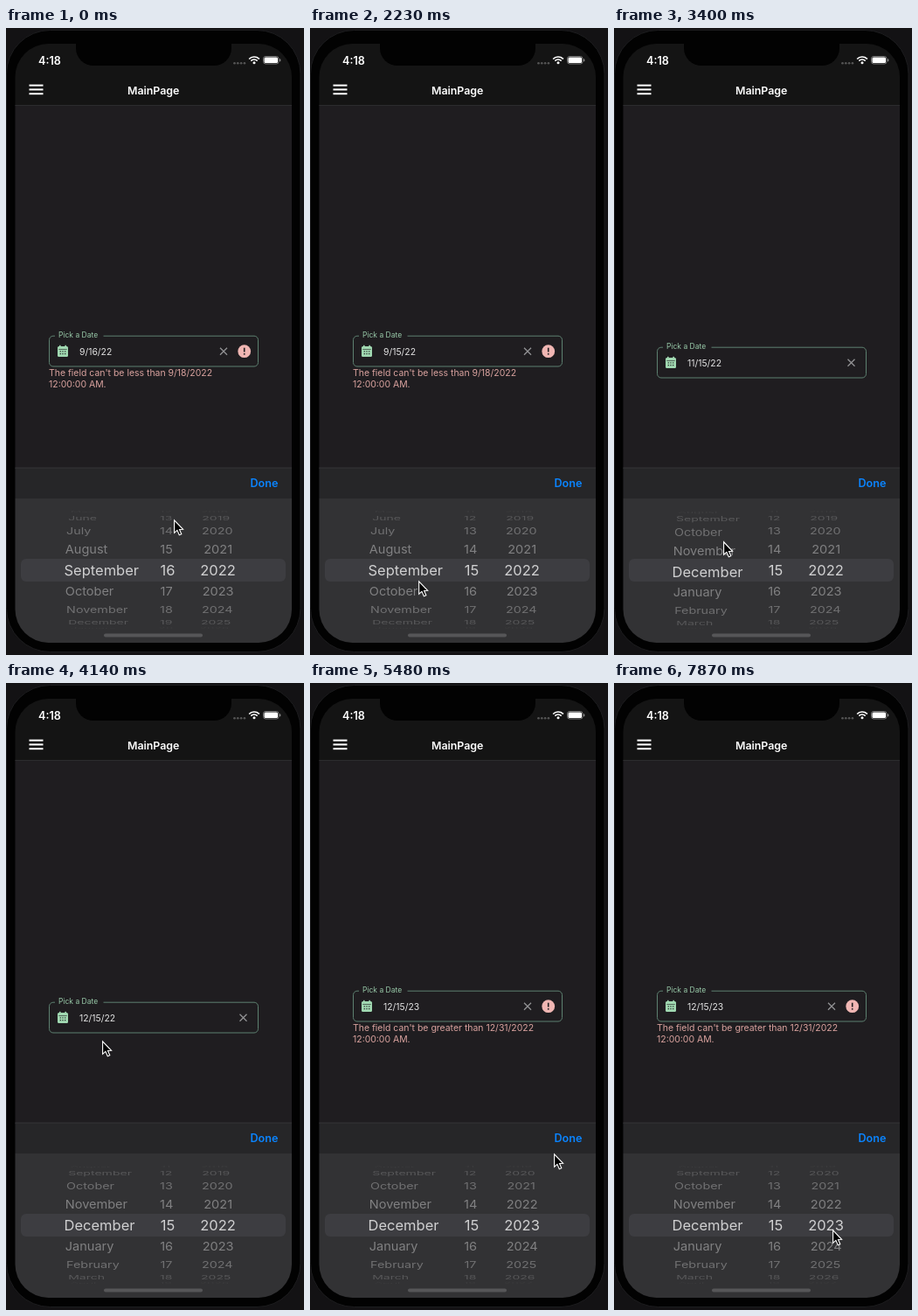
An HTML page with a canvas for the animation above (8 s loop, 341x717 px).

```html
<!DOCTYPE html>
<html lang="en">
<head>
<meta charset="utf-8">
<title>Date picker</title>
<style>
html, body { margin: 0; width: 100%; height: 100%; overflow: hidden; background: #111; }
canvas { display: block; width: 341px; height: 717px; }
</style>
</head>
<body>
<canvas id="stage"></canvas>
<script>
const W = 341, H = 717, LOOP = 8000, STEP = LOOP / 54;
const canvas = document.getElementById('stage');
const ctx = canvas.getContext('2d');
const dpr = window.devicePixelRatio || 1;
canvas.width = W * dpr;
canvas.height = H * dpr;

const PAGE = '#1f1d20', BEZEL = '#020202', GREEN = '#a0d8b1';
const MONTHS = ['January', 'February', 'March', 'April', 'May', 'June', 'July',
  'August', 'September', 'October', 'November', 'December'];

const FIRST = { year: 2022, month: 9, day: 16 };
const SPINS = [
  { part: 'day', by: -1, start: 300, end: 740 },
  { part: 'month', by: 2, start: 2230, end: 2670 },
  { part: 'month', by: 1, start: 2963, end: 3555 },
  { part: 'year', by: 1, start: 4593, end: 5000 }];
const FIELD_LAG = 250;

// Places the pointer heads for: time, x, y
const POINTER = [
  [0, 192, 562], [740, 184, 632], [1185, 122, 403], [1800, 203, 610], [2230, 124, 632],
  [2800, 122, 612], [3400, 125, 587], [4148, 110, 409], [4593, 248, 625], [5482, 279, 538],
  [5778, 287, 530], [6000, 287, 530], [6370, 257, 613], [7037, 173, 612], [7800, 250, 625]];

const clamp = p => Math.min(1, Math.max(0, p));
const easeOut = p => 1 - (1 - p) ** 2;
const easeInOut = p => p * p * (3 - 2 * p);

function pointerAt(t) {
  const next = POINTER.findIndex(k => k[0] > t);
  if (next < 0) return POINTER.at(-1).slice(1);
  const [t0, x0, y0] = POINTER[next - 1], [t1, x1, y1] = POINTER[next];
  const p = easeInOut((t - t0) / (t1 - t0));
  return [x0 + (x1 - x0) * p, y0 + (y1 - y0) * p];
}

function wheelsAt(t) {
  const wheels = { ...FIRST };
  for (const { part, by, start, end } of SPINS)
    wheels[part] += by * easeOut(clamp((t - start) / (end - start)));
  return wheels;
}

// The field takes a new date once the wheel has come to rest
function dateAt(t) {
  const date = { ...FIRST };
  for (const { part, by, end } of SPINS) if (t >= end + FIELD_LAG) date[part] += by;
  return date;
}

function errorFor({ year, month, day }) {
  const n = year * 10000 + month * 100 + day;
  return n < 20220918 ? 'less than 9/18/2022' : n > 20221231 ? 'greater than 12/31/2022' : '';
}

function box(x, y, w, h, r, fill) {
  ctx.beginPath();
  ctx.roundRect(x, y, w, h, r);
  if (fill) { ctx.fillStyle = fill; ctx.fill(); }
}

function outline(color, width = 1) {
  ctx.strokeStyle = color;
  ctx.lineWidth = width;
  ctx.stroke();
}

function rect(x, y, w, h, fill) {
  ctx.fillStyle = fill;
  ctx.fillRect(x, y, w, h);
}

function disc(x, y, r, fill) {
  ctx.beginPath();
  ctx.arc(x, y, r, 0, 7);
  ctx.fillStyle = fill;
  ctx.fill();
}

// y is the middle of the capital letters
function text(str, x, y, size, color, weight = 400, align = 'left') {
  ctx.font = `${weight} ${size}px Inter, Roboto, sans-serif`;
  ctx.textAlign = align;
  ctx.fillStyle = color;
  ctx.fillText(str, x, y + size * 0.363);
}

function drawPhone() {
  rect(0, 0, W, H, '#131214');
  box(0.5, 2.5, 336.5, 711, 50, BEZEL);
  outline('#1d1d1f');
}

function drawStatus() {
  box(80, -8, 178, 51, 20, BEZEL);
  text('4:18', 37, 37, 12.6, '#fff', 600);
  for (let i = 0; i < 4; i++) disc(261.5 + i * 3.8, 40.3, 1.3, '#555');
  for (const r of [8, 5]) {
    ctx.beginPath();
    ctx.arc(284, 41, r, -Math.PI * 0.76, -Math.PI * 0.24);
    outline('#fff', 1.7);
  }
  disc(284, 39.8, 1.5, '#fff');
  box(294.5, 32.5, 17.5, 8.5, 2.5);
  outline('#777');
  box(295.5, 33.5, 15.5, 6.5, 1.5, '#fff');
  box(313, 35.3, 1.3, 3, 0.6, '#888');
  for (let i = 0; i < 3; i++) rect(26.5, 64.6 + i * 4.8, 16, 2, '#fff');
  text('MainPage', 168.7, 71.5, 12.4, '#fff', 600, 'center');
}

function drawCalendar(x, y) {
  box(x, y + 1.3, 12, 12, 1.5, GREEN);
  rect(x + 2, y, 1.6, 2, GREEN);
  rect(x + 8.4, y, 1.6, 2, GREEN);
  rect(x + 1.3, y + 4.4, 9.4, 0.6, PAGE);
  for (let i = 0; i < 6; i++) rect(x + 2.7 + i % 3 * 2.7, y + 6.5 + (i > 2) * 2.7, 1.2, 1.2, PAGE);
}

function drawField(t) {
  const date = dateAt(t), error = errorFor(date);
  const y = error ? 352 : 365, mid = y + 17.7, x = error ? 249 : 271.5;
  box(49.5, y + 0.2, 239, 34.8, 4.5);
  outline('#5d8070');
  rect(56, y - 2, 55.5, 4, PAGE);
  text('Pick a Date', 60, y - 1.2, 8.5, '#98c9a8');
  drawCalendar(59, y + 10.8);
  text(`${date.month}/${date.day}/${date.year % 100}`, 84, mid + 0.2, 10.4, '#e2e2e2');
  ctx.beginPath();
  for (const s of [-1, 1]) {
    ctx.moveTo(x - 4, mid - 4 * s);
    ctx.lineTo(x + 4, mid + 4 * s);
  }
  outline('#929294', 1.3);
  if (!error) return;
  disc(272.7, mid, 7.4, '#f0b6b3');
  rect(271.9, mid - 4, 1.6, 4.8, PAGE);
  rect(271.9, mid + 2.3, 1.6, 1.6, PAGE);
  text("The field can't be " + error, 49, 394.5, 10.46, '#d9a29e');
  text('12:00:00 AM.', 49, 407, 10.46, '#d9a29e');
}

// One wheel column: rows on a cylinder, enlarged inside the selection band
function drawColumn(pos, label, x, bigX, align) {
  const near = Math.round(pos);
  for (const inBand of [false, true]) {
    ctx.save();
    ctx.beginPath();
    if (inBand) ctx.rect(11, 607, 316, 26);
    else { ctx.rect(11, 545, 316, 62); ctx.rect(11, 633, 316, 55); }
    ctx.clip();
    for (let row = near - 4; row <= near + 4; row++) {
      const d = row - pos, angle = d * 0.365;
      if (Math.abs(angle) > 1.55) continue;
      if (inBand) {
        text(label(row), bigX, 620.3 + d * 27, 16.5, '#d0d0d1', 400, align);
        continue;
      }
      const c = Math.cos(angle), s = 0.93 + 0.07 * c;
      ctx.save();
      ctx.translate(169, 620.2 + 67 * Math.sin(angle));
      ctx.scale(s, c);
      text(label(row), x - 169, 0, 14.6, `rgba(255,255,255,${0.41 * c})`, 400, align);
      ctx.restore();
    }
    ctx.restore();
  }
}

function drawPicker(t) {
  const { year, month, day } = wheelsAt(t);
  rect(10, 503, 318, 35, '#262628');
  rect(10, 502.5, 318, 1, '#343436');
  text('Done', 279.5, 520.7, 12.6, '#0a84ff', 600);
  rect(10, 538, 318, 166, '#323234');
  box(17, 607, 303, 26, 6, '#3d3d41');
  drawColumn(month, m => MONTHS[(m + 11) % 12], 67.3, 66.5, 'left');
  drawColumn(day, String, 183.7, 185, 'center');
  drawColumn(year, String, 243, 242.5, 'center');
  box(112, 692.5, 113, 4, 2, '#565658');
}

function drawPointer(t) {
  const [x, y] = pointerAt(t);
  ctx.save();
  ctx.translate(x + 0.6, y + 0.8);
  ctx.beginPath();
  [[0, 0], [0, 14.5], [3.3, 11.6], [5.7, 17], [8.2, 16], [5.9, 10.7], [10, 10.5]]
    .forEach(p => ctx.lineTo(...p));
  ctx.closePath();
  ctx.fillStyle = '#000';
  ctx.fill();
  outline('#fff', 1.1);
  ctx.restore();
}

function draw(now) {
  const t = Math.floor((now % LOOP + 8) / STEP) % 54 * STEP;
  ctx.setTransform(dpr, 0, 0, dpr, 0, 0);
  drawPhone();
  ctx.save();
  box(10.5, 18, 316.5, 685, 38);
  ctx.clip();
  rect(0, 0, W, 88, '#141414');
  rect(0, 88, W, 416, PAGE);
  rect(0, 88, W, 1, '#2c2c2e');
  drawStatus();
  drawField(t);
  drawPicker(t);
  ctx.restore();
  drawPointer(t);
}

const start = performance.now();
(function loop() {
  draw(performance.now() - start);
  requestAnimationFrame(loop);
})();
</script>
</body>
</html>
```
